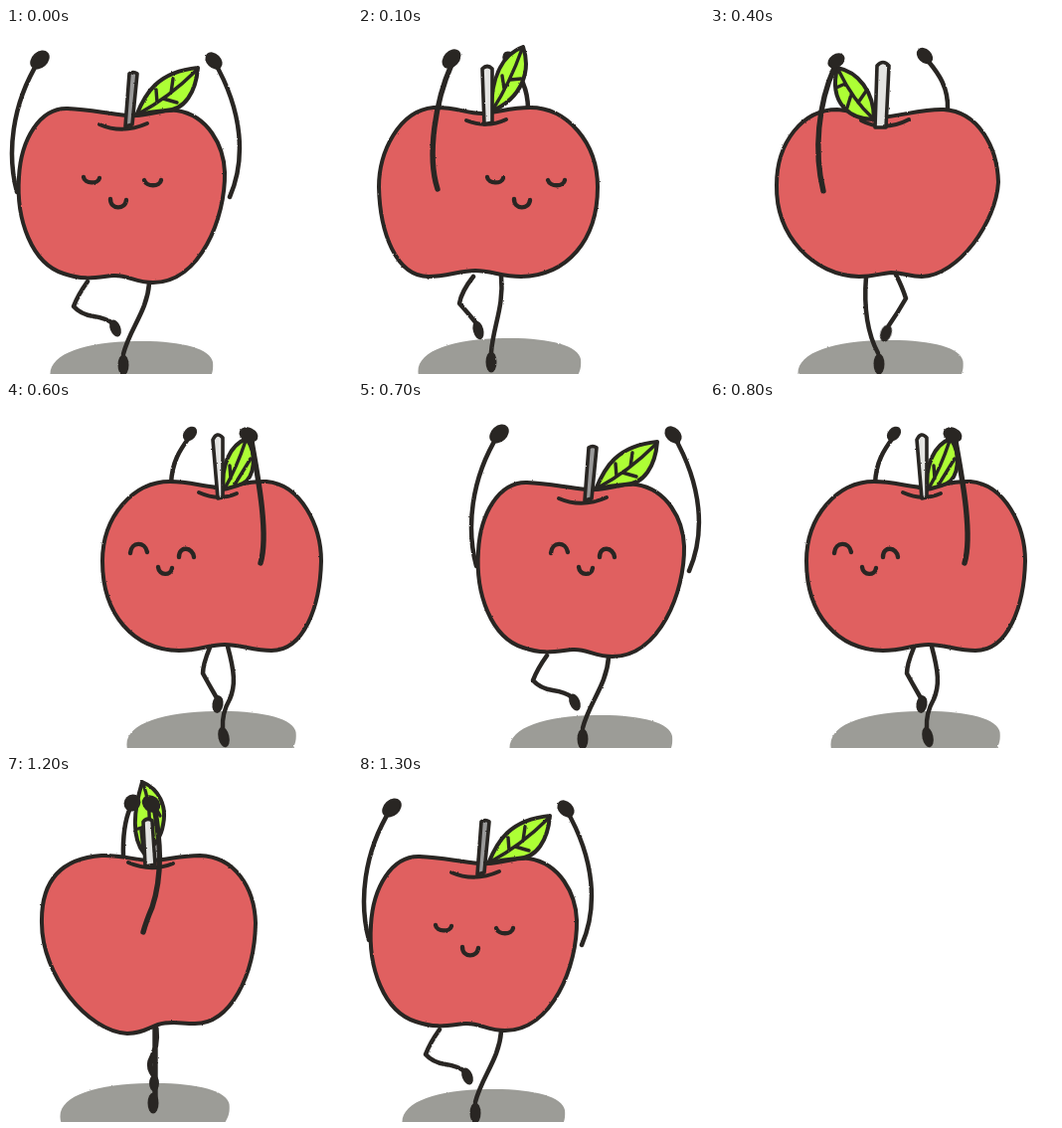
Animation of 348x348 px, one loop 1400 ms. Source, as an HTML page:

```html
<!DOCTYPE html>
<html lang="en">
<head>
<meta charset="utf-8">
<title>Dancing apple</title>
<style>
html, body { margin: 0; width: 100%; height: 100%; overflow: hidden; background: #fff; }
svg { display: block; }
path { fill: none; stroke: #292623; stroke-width: 4; stroke-linecap: round; stroke-linejoin: round; }
.body { fill: #e06060; }
.shade { fill: #9c9c97; stroke: none; }
.leaf { fill: #adff35; stroke-width: 4; }
.vein { stroke-width: 3.4; }
.stem { fill: #e4e4e2; stroke-width: 3.6; }
.limb { stroke-width: 4.5; }
.strong { stroke-width: 5.4; }
.face { stroke-width: 4.4; }
ellipse { fill: #292623; }
#strip { animation: dance 1.4s step-end infinite; }
/* Eight poses side by side: there and back, skipping the second on return. */
@keyframes dance {
  0% { transform: translateX(0); }
  7.1428% { transform: translateX(-348px); }
  14.2857% { transform: translateX(-696px); }
  21.4285% { transform: translateX(-1044px); }
  28.5714% { transform: translateX(-1392px); }
  35.7142% { transform: translateX(-1740px); }
  42.8571% { transform: translateX(-2088px); }
  50% { transform: translateX(-2436px); }
  57.1428% { transform: translateX(-2088px); }
  64.2857% { transform: translateX(-1740px); }
  71.4285% { transform: translateX(-1392px); }
  78.5714% { transform: translateX(-1044px); }
  85.7142% { transform: translateX(-696px); }
  92.8571%, 100% { transform: translateX(0); }
}
</style>
</head>
<body>
<svg width="348" height="348" viewBox="0 0 348 348">
<defs>
  <filter id="brush" filterUnits="userSpaceOnUse" x="-10" y="-10" width="368" height="368" color-interpolation-filters="sRGB">
    <feTurbulence type="fractalNoise" baseFrequency=".35" numOctaves="2" seed="4"/>
    <feDisplacementMap in="SourceGraphic" scale="1.8" xChannelSelector="R" yChannelSelector="G"/>
  </filter>
  <ellipse id="hand" rx="11" ry="8"/>
  <ellipse id="foot" rx="5.5" ry="10.5"/>
  <path id="shade" class="shade" d="M4 356C-12 326 28 311 86 310C130 309 162 317 164 331C165 342 162 346 156 356Z"/>
  <g id="front">
    <path class="limb" d="M82 255Q72 269 68 280Q75 288 88 290Q101 292 107 297"/>
    <use href="#foot" transform="translate(110 302) rotate(-22) scale(.95 .85)"/>
    <path class="limb" d="M144 257C142 285 124 303 118 328"/>
    <use href="#foot" x="118" y="339"/>
    <path class="limb" d="M11 165C1 128 5 78 33 33M225 170C241 133 239 85 209 33"/>
    <use href="#hand" transform="translate(34 32) rotate(-42)"/>
    <use href="#hand" transform="translate(209 33) rotate(45) scale(.9)"/>
    <path class="body" d="M13 150C15 112 34 80 62 81C85 82 100 86 122 88C140 90 158 81 172 83C203 88 219 118 220 145C221 191 195 256 148 256C130 256 122 248 108 249C90 251 78 254 58 247C26 237 10 193 13 150Z"/>
    <path d="M94 97Q117 107 142 96"/>
    <path class="stem" style="fill:#999" d="M124 46Q128 43 132 46L127 97L120 99Z"/>
    <path class="leaf" d="M131 88C140 66 152 44 193 40C191 64 180 83 160 83C146 84 138 86 131 88Z"/>
    <path class="vein" d="M132 87Q164 70 192 42M152 75L151 62M166 65L168 51M158 71L172 75"/>
  </g>
  <path id="smile" class="face" d="M125 152C126 140 140 140 142 151M174 156C174 144 188 146 189 156M153 166C154 175 166 175 167 167"/>
  <path id="calm" class="face" d="M78 150C79 157 93 157 94 151M139 153C141 160 155 160 156 153M105 172C105 183 120 183 121 173"/>
  <path id="turned" class="body" d="M97 160C97 115 128 80 165 80C185 80 197 85 213 86C230 86 240 79 262 80C297 83 317 125 317 160C316 205 300 250 267 250C249 250 235 244 220 244C204 244 194 250 174 250C128 249 97 214 97 160Z"/>
</defs>
<g id="strip">

  <svg x="0" width="348" height="348"><g filter="url(#brush)">
    <use href="#shade" x="44" y="5"/>
    <use href="#front"/>
    <use href="#calm"/>
  </g></svg>

  <svg x="348" width="348" height="348"><g filter="url(#brush)">
    <use href="#shade" x="60" y="2"/>
    <path class="limb" d="M171 82C171 60 163 48 154 36"/>
    <use href="#hand" transform="translate(153 32) rotate(55) scale(.85)"/>
    <path class="limb" d="M116 250Q104 265 102 277Q111 287 119 297"/>
    <use href="#foot" transform="translate(121 304) rotate(-15) scale(.95 .9)"/>
    <path class="limb" d="M144 249C147 280 136 300 134 326"/>
    <use href="#foot" x="134" y="336"/>
    <use href="#turned" transform="translate(338 0) scale(-1 1)"/>
    <path class="leaf" d="M134 84C134 55 142 28 166 19C174 42 166 70 134 84Z"/>
    <path class="vein" d="M135 83Q153 55 165 21M147 61L145 48M153 52L164 51"/>
    <path class="stem" d="M125 41Q130 36 135 41L135 95L127 97Z"/>
    <path d="M109 93Q130 101 149 92"/>
    <use href="#calm" x="52"/>
    <path class="strong" d="M94 37C78 73 69 128 80 162"/>
    <use href="#hand" transform="translate(94 31) rotate(-48)"/>
  </g></svg>

  <svg x="696" width="348" height="348"><g filter="url(#brush)">
    <use href="#shade" transform="translate(54 -1) scale(1.04 1)"/>
    <path class="limb" d="M118 82Q117 50 125 32"/>
    <path class="strong" d="M150 252L150 325M151 254Q153 272 145 287Q143 294 149 302"/>
    <use href="#foot" transform="translate(149 309) scale(.9 .8)"/>
    <use href="#foot" x="148" y="329"/>
    <path class="body" d="M36 148C35 106 55 83 96 80C116 79 130 85 146 85C160 85 175 80 195 80C230 81 250 112 251 148C250 200 226 249 190 249C175 249 165 246 153 250C142 254 136 259 122 259C82 257 36 200 36 148Z"/>
    <path class="leaf" d="M139 78C126 62 128 36 137 6C154 13 162 30 158 49C156 62 149 71 139 78Z"/>
    <path class="vein" d="M139 77Q150 42 138 8M145 49L133 53M148 27L155 40M136 55L138 74"/>
    <path class="stem" d="M138 46Q142 41 147 45L150 89L140 91Z"/>
    <path d="M123 87Q146 97 168 88"/>
    <use href="#hand" transform="translate(127 27) rotate(-45) scale(.8 1)"/>
    <path class="strong" d="M149 30C155 64 158 99 147 132Q141 146 138 157"/>
    <use href="#hand" transform="translate(146 28) rotate(40) scale(.9 1)"/>
  </g></svg>

  <svg x="1044" width="348" height="348"><g filter="url(#brush)">
    <use href="#shade" x="78" y="1"/>
    <path class="limb" d="M72 92Q78 55 92 33"/>
    <use href="#hand" transform="translate(94 27) rotate(-58) scale(.95)"/>
    <path class="limb" d="M154 256C156 285 155 302 163 325"/>
    <use href="#foot" x="165" y="334"/>
    <path class="limb" d="M176 248Q183 263 184 272Q177 285 171 297"/>
    <use href="#foot" transform="translate(172 306) rotate(10) scale(1.05 .9)"/>
    <path class="body" d="M52 153C50 110 76 82 115 81C135 81 148 85 162 85C180 85 195 81 215 81C248 83 266 115 267 150C266 205 240 248 203 248C188 248 180 246 168 249C152 254 145 259 129 259C88 258 52 207 52 153Z"/>
    <path class="leaf" d="M155 81C132 76 105 56 105 12C132 18 155 42 155 81Z"/>
    <path class="vein" d="M154 80Q129 57 106 14M128 50L126 64M140 64L149 50M119 37L109 36M131 52L139 32"/>
    <path class="stem" d="M153 47Q157 40 162 46L166 94L157 94Z"/>
    <path d="M143 91Q164 99 182 93"/>
    <path class="strong" d="M214 160C223 148 222 76 204 36"/>
    <use href="#hand" transform="translate(201 30) rotate(45)"/>
  </g></svg>

  <svg x="1392" width="348" height="348"><g filter="url(#brush)">
    <use href="#shade" transform="translate(88 4) scale(1.015 1)"/>
    <path class="limb" d="M239 82C240 60 230 46 220 34"/>
    <use href="#hand" transform="translate(216 28) rotate(45) scale(.85)"/>
    <path class="limb" d="M157 250C155 275 156 303 169 327"/>
    <use href="#foot" x="170" y="338"/>
    <path class="limb" d="M187 248Q194 262 197 272Q189 286 180 299"/>
    <use href="#foot" transform="translate(177 307) rotate(20) scale(1 .85)"/>
    <path class="body" d="M67 158C67 115 93 82 128 82C145 83 155 90 170 90C190 89 215 81 235 82C270 84 289 120 290 155C288 195 250 249 213 250C200 250 195 246 182 246C170 247 165 250 150 250C104 249 66 209 67 158Z"/>
    <path d="M152 93Q175 105 200 92"/>
    <path class="stem" d="M168 38Q174 31 180 38L177 100L166 100Z"/>
    <path class="leaf" d="M165 92C142 92 119 77 128 40C149 44 165 64 165 92Z"/>
    <path class="vein" d="M164 91Q144 73 129 42M142 67L138 80M149 75L158 62M136 56L127 60"/>
    <path class="strong" d="M125 40C109 76 104 124 114 164"/>
    <use href="#hand" transform="translate(127 33) rotate(-35) scale(.85)"/>
  </g></svg>

  <svg x="1740" width="348" height="348"><g filter="url(#brush)">
    <use href="#shade" transform="translate(105 2) scale(1.03 1)"/>
    <path class="limb" d="M213 82Q216 54 208 34"/>
    <use href="#hand" transform="translate(206 29) rotate(50) scale(.85)"/>
    <path class="strong" d="M193 248C192 275 193 300 194 326M193 250Q188 268 193 280Q199 290 195 302"/>
    <use href="#foot" transform="translate(195 308) scale(.9 .8)"/>
    <use href="#foot" x="195" y="336"/>
    <use href="#turned" x="-14"/>
    <path d="M175 93Q196 102 217 92"/>
    <path class="stem" d="M190 37Q196 32 201 37L200 96L191 97Z"/>
    <path class="leaf" d="M195 97C177 83 179 59 189 45C206 55 210 82 195 97Z"/>
    <path class="vein" d="M195 95Q198 68 190 48M196 72L186 75M196 80L202 71"/>
    <path class="strong" d="M181 37C185 73 190 110 188 136Q187 149 184 163"/>
    <use href="#hand" transform="translate(180 31) rotate(-20) scale(.9)"/>
  </g></svg>

  <svg x="2088" width="348" height="348"><g filter="url(#brush)">
    <use href="#shade" transform="translate(121 1) scale(1.04 1)"/>
    <path class="limb" d="M166 82C167 60 175 48 184 36"/>
    <use href="#hand" transform="translate(185 32) rotate(-48) scale(.75)"/>
    <path class="limb" d="M205 247Q198 264 198 273Q204 284 211 296"/>
    <use href="#foot" transform="translate(213 304) rotate(8) scale(1 .85)"/>
    <path class="limb" d="M223 246C230 272 231 285 225 299Q217 313 218 328"/>
    <use href="#foot" transform="translate(219 337) rotate(-12)"/>
    <use href="#turned"/>
    <path d="M194 91Q214 100 232 92"/>
    <path class="stem" d="M208 38Q212 29 218 36L218 96L213 97Z"/>
    <path class="leaf" d="M219 88C216 65 225 43 242 37C253 52 250 76 238 82C230 86 224 86 219 88Z"/>
    <path class="vein" d="M220 87Q232 66 241 39M226 77L225 64M230 83L246 57"/>
    <use href="#smile"/>
    <path class="strong" d="M246 34C252 68 265 132 256 162"/>
    <use href="#hand" transform="translate(244 33) rotate(25) scale(.9)"/>
  </g></svg>

  <svg x="2436" width="348" height="348"><g filter="url(#brush)">
    <use href="#shade" x="152" y="5"/>
    <use href="#front" x="108"/>
    <use href="#smile" x="69"/>
  </g></svg>

</g>
</svg>
</body>
</html>
```
